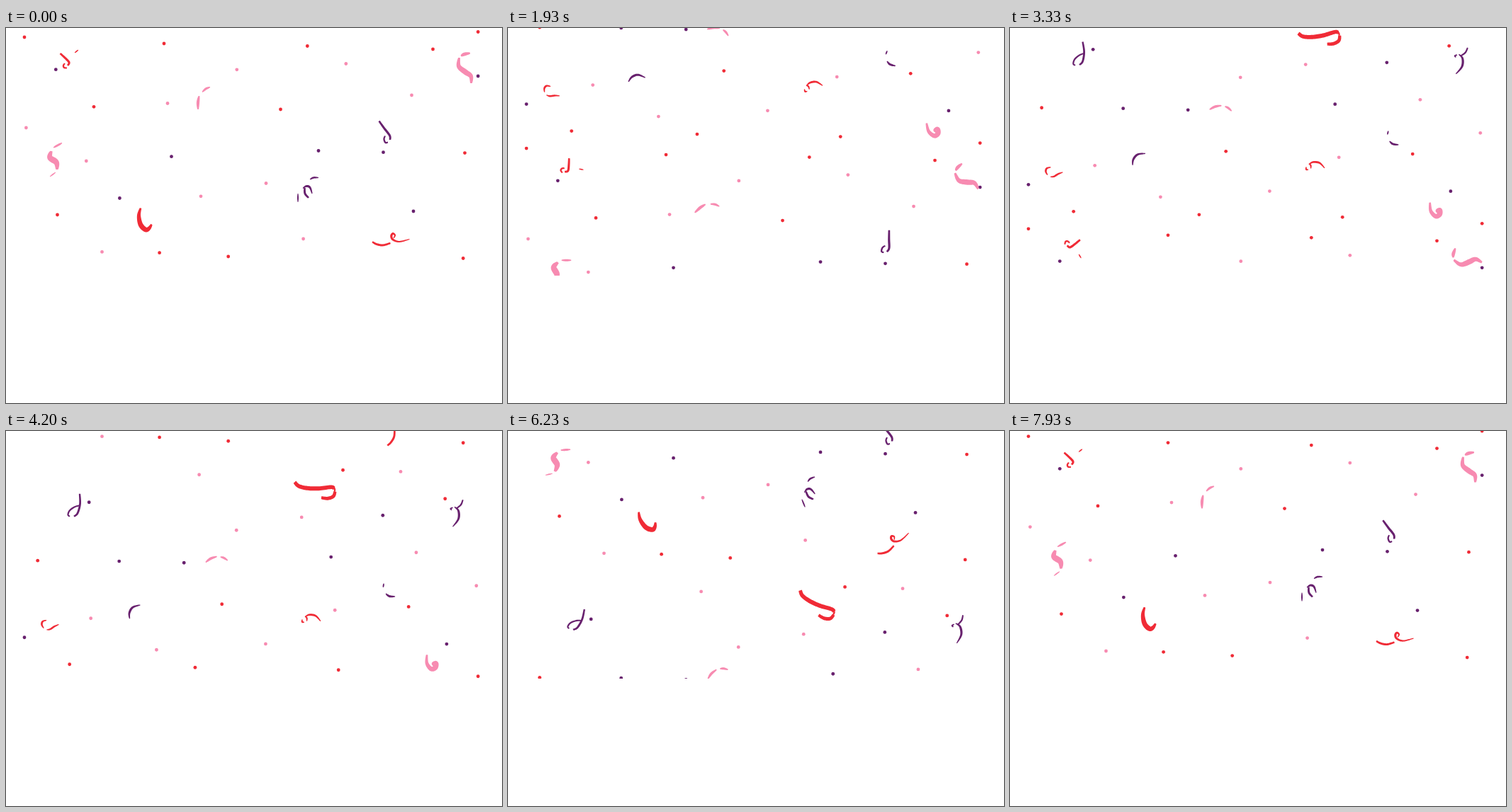
These frames come from a looping animation (700 px wide and 530 px high, 8010 ms). An HTML page with a canvas:

```html
<!DOCTYPE html>
<html lang="en">
<head>
<meta charset="utf-8">
<title>Falling confetti</title>
<style>
  html, body { margin: 0; width: 100%; height: 100%; overflow: hidden; background: #fff; }
  canvas { display: block; }
</style>
</head>
<body>
<canvas id="stage" width="700" height="530"></canvas>
<script>
const ctx = document.getElementById('stage').getContext('2d');
const RED = '#f02b36', PINK = '#f78bb1', PURPLE = '#68216e';
const LOOP = 8010, CYCLE = 8000, SPAN = 650, FLOOR = 350, LEAD = 280;

const dots = [], ribbons = [];
const dot = (color, x, y) => dots.push({ color, x, y });

// The scatter repeats itself under a half turn about (346, 9).
function twins(color, ...spots) {
  for (const [x, y] of spots) {
    dot(color, x, y);
    dot(color, 692.2 - x, 18.5 - y);
  }
}

twins(RED, [26, 13], [223, 22], [425.3, 25.5], [602.5, 30], [124, 111.3], [387.5, 115],
  [647.5, 176.6], [72.5, 264]);
twins(PURPLE, [70.3, 58.7], [666.2, 68], [441, 173.5], [532.5, 175.7], [233.5, 181.7],
  [160.4, 240.5], [575, 259]);
twins(PINK, [479.8, 50.5], [325.8, 58.8], [572.5, 95], [228, 106.5], [28.4, 141],
  [113.3, 188], [367, 219.5], [275, 237.8], [419.6, 298]);

// Row at the seam of the pattern
dot(PINK, 135.5, 316.4);
dot(PINK, 557, -283.8);
dot(RED, 216.6, 317.7);
dot(RED, 475.5, -286);
dot(RED, 313.7, 323);
dot(RED, 645.2, 325.5);

// Turning rules give degrees from the drawn pose.
const ease = t => (1 - Math.cos(2 * Math.PI * t / CYCLE)) / 2;
const swing = (amp, lag = 0, rest = 0) => t => amp * (ease(t - lag) - ease(rest - lag));
const drift = (rate, rest) => (t, top) => rate * (top - rest);

// Strokes: tapered ones thin out at both tips, blunt ones barely do.
const taper = (w, ...pts) => ({ w, tip: .35, pts });
const blunt = (w, ...pts) => ({ w, tip: .8, pts });

function ribbon(color, x, y, turn, ...strokes) {
  ribbons.push({ color, x, y, turn, paths: strokes.map(brush) });
}

// Catmull-Rom curve through the points
function curvePoint(pts, u) {
  const n = pts.length - 1, i = Math.min(Math.floor(u * n), n - 1), f = u * n - i;
  const at = k => pts[Math.max(0, Math.min(n, k))];
  const [a, b, c, d] = [at(i - 1), at(i), at(i + 1), at(i + 2)];
  return [0, 1].map(j => b[j] + f / 2 * (c[j] - a[j] +
    f * (2 * a[j] - 5 * b[j] + 4 * c[j] - d[j] + f * (3 * (b[j] - c[j]) + d[j] - a[j]))));
}

// Outline of a stroke whose width swells towards the middle
function brush({ w, tip, pts }) {
  const steps = pts.length * 8, left = [], right = [];
  for (let i = 0; i <= steps; i++) {
    const u = i / steps, [x, y] = curvePoint(pts, u);
    const [x0, y0] = curvePoint(pts, Math.max(0, u - .01));
    const [x1, y1] = curvePoint(pts, Math.min(1, u + .01));
    const len = Math.hypot(x1 - x0, y1 - y0) || 1;
    const r = w / 2 * (tip + (1 - tip) * Math.sin(Math.PI * u));
    const nx = (y0 - y1) / len * r, ny = (x1 - x0) / len * r;
    left.push([x + nx, y + ny]);
    right.unshift([x - nx, y - ny]);
  }
  const path = new Path2D();
  left.concat(right).forEach(p => path.lineTo(...p));
  path.closePath();
  return path;
}

ribbon(RED, 91, 42, swing(105),
  blunt(3.2, [76.5, 36], [82, 41], [88, 47], [89, 50], [87, 53]),
  blunt(2.4, [83, 50], [81, 53], [82, 56], [86, 56.5]),
  taper(1.7, [97, 35], [102, 31]));

ribbon(PINK, 67, 187, swing(60),
  taper(3, [67, 169], [79, 162.5]),
  taper(8.5, [64, 174], [62, 183], [71, 190], [72, 200]),
  taper(1.8, [70, 204], [62, 210]));

ribbon(PINK, 646, 61, swing(-64),
  taper(4.8, [642, 39.5], [647, 37], [655, 35.5]),
  taper(7.5, [639.5, 42], [639, 54], [648, 62], [656, 68], [656.5, 78]));

ribbon(PINK, 280, 101, swing(100),
  taper(3.2, [277, 90.5], [282, 86], [288, 83.5]),
  taper(4.2, [272.5, 96], [271, 105], [271, 115]));

ribbon(PURPLE, 536.5, 147.5, swing(53, -880),
  blunt(3.2, [526.5, 131.5], [534, 142], [541.5, 152], [542, 158]),
  blunt(2.4, [535, 152.5], [533.5, 157], [535.5, 162], [539, 161.5]));

ribbon(PURPLE, 429, 230, swing(-54),
  taper(2.6, [429, 214], [434, 211.5], [441, 211.5]),
  taper(3.2, [419, 226.5], [424, 223.5], [429, 225.5], [432, 234]),
  blunt(3, [421.5, 226], [422, 234], [427, 240]),
  taper(2, [412, 234], [412, 246]));

ribbon(RED, 195.5, 269, swing(-60),
  taper(7, [190, 254.5], [187.5, 265], [190, 278], [197, 285], [202, 283], [205.5, 277.5]));

ribbon(RED, 546.7, 300.7, swing(-71),
  blunt(3, [517, 302.3], [523, 305.5], [532, 307], [542.5, 304]),
  taper(3.2, [547, 297], [549, 293], [546, 290.5], [543.8, 294], [546, 299], [555, 302], [569.5, 298.5]));

ribbon(RED, 60, -68, swing(-52, 0, 3333),
  taper(2.8, [57.5, -74], [52, -72.5], [50.5, -68], [53, -63]),
  taper(2.6, [57, -60.5], [62, -61], [68, -64.5], [74.5, -67]));

ribbon(PURPLE, 179.5, -85, swing(-55, 500, 3333),
  taper(3.2, [173, -77], [174, -85], [180, -92], [191, -93.5]));

ribbon(RED, 433, -74, swing(32, 0, 4200),
  taper(2.9, [422, -78.5], [428, -81.5], [437, -80], [444, -72.5]),
  taper(2.3, [422, -79.5], [424.5, -77], [424.5, -72.5]),
  taper(2.3, [418, -75], [418, -71.5], [421, -71]));

ribbon(PINK, 280.5, -157, drift(-.12, 277),
  taper(3.6, [282, -156], [288, -162.5], [296, -167]),
  taper(3.2, [301, -167.5], [306, -167], [312, -164.5]));

ribbon(PURPLE, 530.4, -116, drift(-.067, 323),
  taper(2, [532, -126], [531.8, -120.5]),
  taper(3, [536.5, -112], [542, -109], [550, -109.5]));

ribbon(PINK, 602, -11, drift(.08, 330),
  taper(7, [594, -25], [594, -13], [600, -5], [606, -7], [607, -13], [603, -12.5], [604, -9.5]));

ribbon(RED, 439.7, -263, drift(.14, 78),
  blunt(6, [407.5, -269], [413, -263.5], [425, -260.5], [441, -260], [459, -262], [463, -260]),
  blunt(2.5, [460, -262], [463.5, -260], [464, -256]),
  blunt(5, [464.5, -256], [462, -249], [454, -246], [445, -247]));

ribbon(PURPLE, 113.7, -238.6, drift(.089, 102.6),
  blunt(2.9, [104, -252.5], [104.5, -238], [101, -225], [96, -220.5]),
  blunt(2.3, [104, -236], [97, -234], [90, -229], [87.5, -223], [90, -220.5]));

ribbon(PURPLE, 628, -226, drift(-.05, 115),
  blunt(2.3, [644.8, -244], [642, -237], [636, -232]),
  taper(3.2, [633, -234], [638.5, -228.5], [638.5, -217], [630.5, -206]),
  blunt(2, [630.5, -233], [627.5, -231.5], [629, -229.5]));

const fallen = (y, t) => (y + SPAN * t / CYCLE + LEAD + SPAN) % SPAN - LEAD;

function draw(t) {
  ctx.clearRect(0, 0, 700, 530);
  ctx.save();
  ctx.beginPath();
  ctx.rect(0, 0, 700, FLOOR);
  ctx.clip();
  for (const { color, x, y } of dots) {
    ctx.fillStyle = color;
    ctx.beginPath();
    ctx.arc(x, fallen(y, t), 2.4, 0, 2 * Math.PI);
    ctx.fill();
  }
  for (const { color, x, y, turn, paths } of ribbons) {
    const top = fallen(y, t);
    ctx.save();
    ctx.translate(x, top);
    ctx.rotate(turn(t, top) * Math.PI / 180);
    ctx.translate(-x, -y);
    ctx.fillStyle = color;
    paths.forEach(p => ctx.fill(p));
    ctx.restore();
  }
  ctx.restore();
}

// Two poses per 100 ms: one held 30 ms, the next 70 ms
function poseTime(t) {
  if (t >= CYCLE) return CYCLE - 66.7;
  const base = Math.floor(t / 100) * 100;
  return base + (t - base >= 30 ? 33.3 : 0);
}

const start = performance.now();
function tick() {
  draw(poseTime((performance.now() - start) % LOOP));
  requestAnimationFrame(tick);
}
tick();
</script>
</body>
</html>
```
